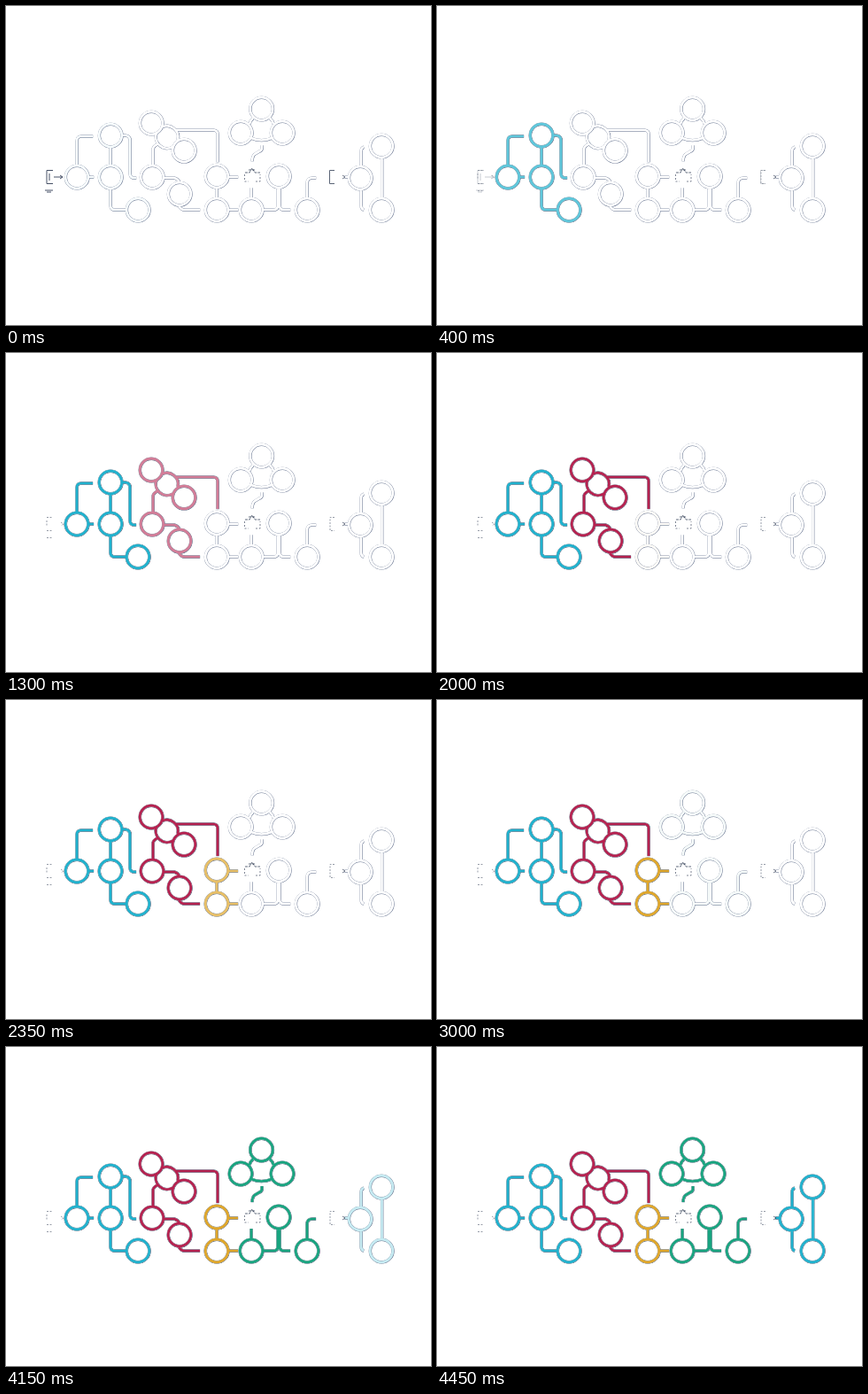
Recreate the animation shown at these times as an HTML page. Size 480x360 px, loop 5000 ms.

```html
<!DOCTYPE html>
<html lang="en">
<head>
<meta charset="utf-8">
<title>Network build-up</title>
<style>
html, body { margin: 0; width: 100%; height: 100%; overflow: hidden; background: #fff; }
svg { display: block; width: 480px; height: 360px; }
path { fill: none; stroke-linejoin: round; }
.edge { stroke: #66738f; stroke-width: 3.3; }
.core { stroke: #fff; stroke-width: 2.7; }
.tint { stroke-width: 2.7; opacity: 0; }
.rim { stroke: #22364c; stroke-width: 3.5; opacity: 0; }
.mark { stroke: #2c3850; stroke-width: 1; }
</style>
</head>
<body>
<svg id="stage" viewBox="0 0 480 360"></svg>
<script>
const LOOP = 5000, STEP = 50, STEPS = 10, R = 12.8;
const stage = document.getElementById('stage');

const groups = [
  { color: '#1fb1cd', start: 50,
    rings: [[80, 193], [118, 146], [118, 193], [149, 230]],
    links: `M80 180V152Q80 147 85 147H98 M118 159V180 M130 146H134Q140 146 140 152V189Q140 194 145 194H147
      M93 193H99 M118 206V225Q118 230 123 230H136` },
  { color: '#b5214f', start: 1000,
    rings: [[164, 132], [201, 163], [165, 193], [196, 212]],
    links: `M176 136.5A12.8 12.8 0 0 1 194 151 M170 143A12.8 12.8 0 0 0 188 159
      M166 180V162Q166 158 171 156 M191 140H234Q239 140 239 145V176
      M178 194H190Q194 195 196 199 M195 225Q197 230 202 230H219` },
  { color: '#dfa62a', start: 2000,
    rings: [[238, 192], [238, 230]],
    links: 'M238 205V217 M251 193H262 M251 230H262' },
  { color: '#18a47f', start: 3000,
    rings: [[265, 143], [288.5, 116], [312, 143], [277, 230], [308, 192], [340, 230]],
    links: `M277 149Q288.5 154 300 149 M279 126.5Q275.5 129.5 275 133 M298 126.5Q301.5 129.5 302 133
      M289 157V160Q289 163 286 164L281 167Q278 169 278 175
      M277 217V205 M290 230H302Q307 230 307 225V205 M309 205V225Q309 230 314 230H321
      M340 217V200Q340 194 346 194H350` },
  { color: '#1fb1cd', start: 4000,
    rings: [[400, 194], [424, 158], [424, 230]],
    links: `M404 159Q401 160 401 164V180 M401 207V225Q401 229 404 230
      M424.5 171V217 M382 193H388` }
];

const ring = ([x, y]) => `M${x - R} ${y}a${R} ${R} 0 1 1 ${2 * R} 0a${R} ${R} 0 1 1 ${-2 * R} 0Z`;

function addPath(d, cls, attrs = {}) {
  const p = document.createElementNS('http://www.w3.org/2000/svg', 'path');
  p.setAttribute('d', d);
  p.setAttribute('class', cls);
  for (const k in attrs) p.setAttribute(k, attrs[k]);
  stage.append(p);
  return p;
}

// Stepped fade with a soft start, held until the loop restarts
function fade(el, start, from, to) {
  const frames = [{ offset: 0, opacity: from, easing: 'step-end' }];
  for (let i = 1; i <= STEPS; i++) {
    frames.push({
      offset: (start + (i - 1) * STEP) / LOOP,
      opacity: from + (to - from) * (i / STEPS) ** 1.5,
      easing: 'step-end'
    });
  }
  frames.push({ offset: 1, opacity: to });
  el.animate(frames, { duration: LOOP, iterations: Infinity }).startTime = 0;
}

for (const { color, start, rings, links } of groups) {
  const d = rings.map(ring).join('') + links;
  addPath(d, 'edge', { transform: 'translate(.2 .15)' });
  const rim = addPath(d, 'rim');
  addPath(d, 'core');
  const tint = addPath(d, 'tint', { stroke: color });
  fade(rim, start, 0, 0.6);
  fade(tint, start, 0, 1);
}

// Small connectors at both ends and the hub in the middle
const plug = addPath('M53 185.5H46V200.5H53 M49 189V197 M54 193H64 M61 191L64 193L61 195 M44 208H53 M46 210H51',
  'mark', { 'stroke-width': 1.5 });
fade(plug, 50, 0.9, 0);
const faintPlug = addPath('M46 185.5H53 M46 189V195 M46 200.5H53 M62 191L65 193L62 195 M46 208.5H52',
  'mark', { 'stroke-dasharray': '2 1.5' });
fade(faintPlug, 50, 0, 0.5);

const socket = addPath('M371 185.5H365.5V200.5H371', 'mark');
fade(socket, 50, 0.8, 0);
const faintSocket = addPath('M371 185.5H366V200.5H371', 'mark', { 'stroke-dasharray': '2 1.5' });
fade(faintSocket, 50, 0, 0.5);
addPath('M380 191L383 193L380 195', 'mark', { opacity: 0.7 });

addPath('M270 188H275L278 183L281 188H287 M274 185H282', 'mark', { 'stroke-dasharray': '3 1', opacity: 0.75 });
addPath('M269.5 190V198H274 M282 198H287V190', 'mark', { 'stroke-dasharray': '2 2', opacity: 0.6 });
</script>
</body>
</html>
```
